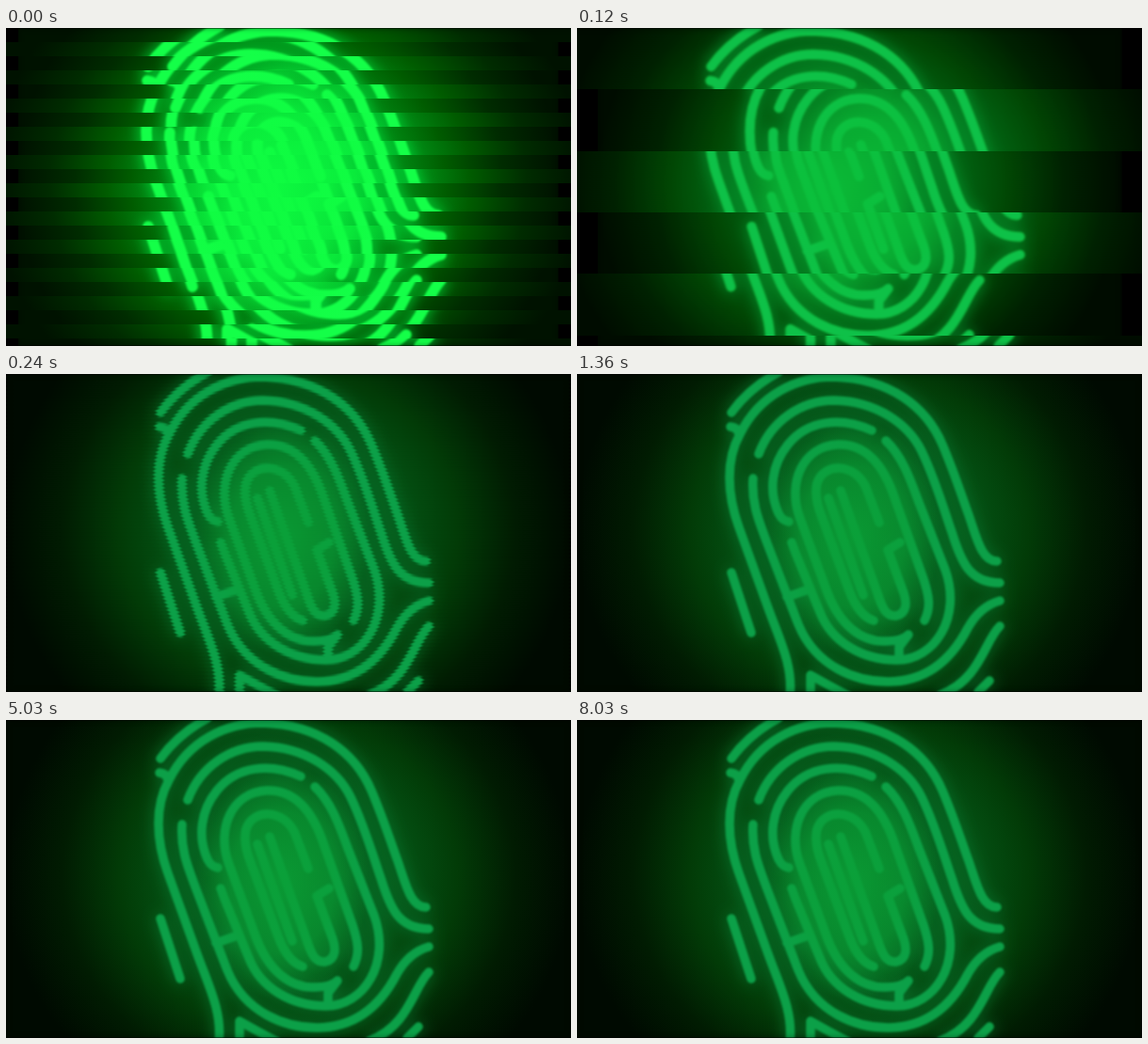
Animation of 600x338 px, one loop 8360 ms. Source, as an HTML page with a canvas:

```html
<!DOCTYPE html>
<html lang="en">
<head>
<meta charset="utf-8">
<title>Fingerprint glitch</title>
<style>
  html, body { margin: 0; height: 100%; overflow: hidden; background: #000; }
  canvas { display: block; width: 100vw; height: 100vh; }
</style>
</head>
<body>
<canvas id="stage" width="600" height="338"></canvas>
<script>
const W = 600, H = 338, LOOP = 8360;
const ctx = document.getElementById('stage').getContext('2d');

const ridges = new Path2D([
  // outer whorl
  'M164 41C177 23 194 9 214-2',
  'M163 56Q171 57 172 64M226 342C230 310 214 280 202 246L172 163C159 127 158 91 173 64C194 21 235 3 272 3C333 5 371 35 388 75C400 103 408 128 416 150C425 176 430 199 446 199',
  'M193 85C206 50 238 28 273 28C318 29 352 53 366 82C380 111 390 145 398 168C408 200 417 222 449 222',
  'M164 211L185 275',
  // middle loops
  'M313 60C280 45 245 49 224 75C207 96 203 124 214 148Q218 156 225 157',
  'M187 111C185 139 194 158 202 180L235 266C254 312 297 327 330 327C377 327 401 297 415 270Q428 247 449 241',
  'M328 71C345 87 354 112 362 134L391 208C409 258 380 304 340 304C302 304 270 284 258 253L232 190L228 179',
  'M223 237L243 230M342 302V290L352 277',
  // core
  'M369 262C376 248 374 236 368 218L338 134C326 97 307 74 277 75C239 77 224 116 236 151L264 227C278 267 302 285 328 284Q345 284 352 277',
  'M321 158L307 121C295 94 262 94 255 116C252 128 256 142 260 152L289 230Q299 257 315 262',
  'M280 124L318 230C324 249 328 258 339 257C351 254 350 242 347 233L330 187L343 179',
  'M267 132L304 235',
  // lower edge
  'M248 342V320Q262 328 288 342',
  'M449 268C432 285 428 325 386 341',
  'M438 326L426 338'
].join(''));

const looks = {
  dim: {
    back: ['#076c20', '#045817', '#023b07', '#011c02', '#000a01'],
    ridge: '#0ca048', glow: '#08702c', width: 9.5,
    core: '10,160,54', coreAlpha: 0.85, coreSize: 1
  },
  hot: {
    back: ['#00d838', '#00a01c', '#005c00', '#002c00', '#001200'],
    ridge: '#14ff48', glow: '#00dc3c', width: 11.5,
    core: '14,252,64', coreAlpha: 0.95, coreSize: 1.2
  }
};

function ellipse(c, x, y, rx, ry, stops) {
  c.save();
  c.translate(x, y);
  c.scale(rx, ry);
  const g = c.createRadialGradient(0, 0, 0, 0, 0, 1);
  stops.forEach(([at, color]) => g.addColorStop(at, color));
  c.fillStyle = g;
  c.fillRect(-x / rx, -y / ry, W / rx, H / ry);
  c.restore();
}

function newLayer() {
  const layer = document.createElement('canvas');
  layer.width = W;
  layer.height = H;
  return layer;
}

function paint({ back, ridge, glow, width, core, coreAlpha, coreSize }) {
  const layer = newLayer(), c = layer.getContext('2d');
  const at = [0, 0.35, 0.6, 0.8, 1];
  ellipse(c, 300, 165, 300, 280, back.map((color, i) => [at[i], color]));

  c.lineCap = c.lineJoin = 'round';
  c.lineWidth = width;
  c.strokeStyle = ridge;
  c.shadowColor = glow;
  c.shadowBlur = 16;
  c.filter = 'blur(0.8px)';
  c.stroke(ridges);
  c.filter = 'none';
  c.shadowBlur = 0;

  ellipse(c, 293, 173, 92 * coreSize, 125 * coreSize, [
    [0, `rgba(${core},${coreAlpha})`],
    [0.6, `rgba(${core},${coreAlpha * 0.7})`],
    [1, `rgba(${core},0)`]
  ]);

  c.strokeStyle = '#000';
  c.lineWidth = 1;
  c.shadowColor = '#000';
  c.shadowBlur = 5;
  c.strokeRect(0, 0, W, H);
  return layer;
}

const dim = paint(looks.dim), hot = paint(looks.hot);
const mix = newLayer(), mixCtx = mix.getContext('2d');

// start ms, band height, shift of even bands, heat
const steps = [
  [0, 15, 13, 1],
  [30, 11, 7, 1],
  [60, 7.5, 2.5, 1],
  [90, 30, -10, 0.7],
  [120, 65.3, -21.5, 0.35],
  [180, 16, 5, 0.2],
  [210, 6, 2, 0.08],
  [240, 2, 0.6, 0],
  [850, H, 0, 0]
];

function draw(t) {
  let [start, band, shift, heat] = steps.findLast(s => s[0] <= t);
  if (start === 240) shift *= (850 - t) / 610;

  mixCtx.globalAlpha = 1;
  mixCtx.drawImage(dim, 0, 0);
  mixCtx.globalAlpha = heat;
  mixCtx.drawImage(hot, 0, 0);

  ctx.fillStyle = '#000';
  ctx.fillRect(0, 0, W, H);
  for (let i = 0; i * band < H; i++) {
    const y = Math.round(i * band);
    const h = Math.min(H, Math.round((i + 1) * band)) - y;
    if (h > 0) ctx.drawImage(mix, 0, y, W, h, i % 2 ? -shift : shift, y, W, h);
  }
}

const begin = performance.now();
function frame() {
  draw((performance.now() - begin) % LOOP);
  requestAnimationFrame(frame);
}
frame();
</script>
</body>
</html>
```
